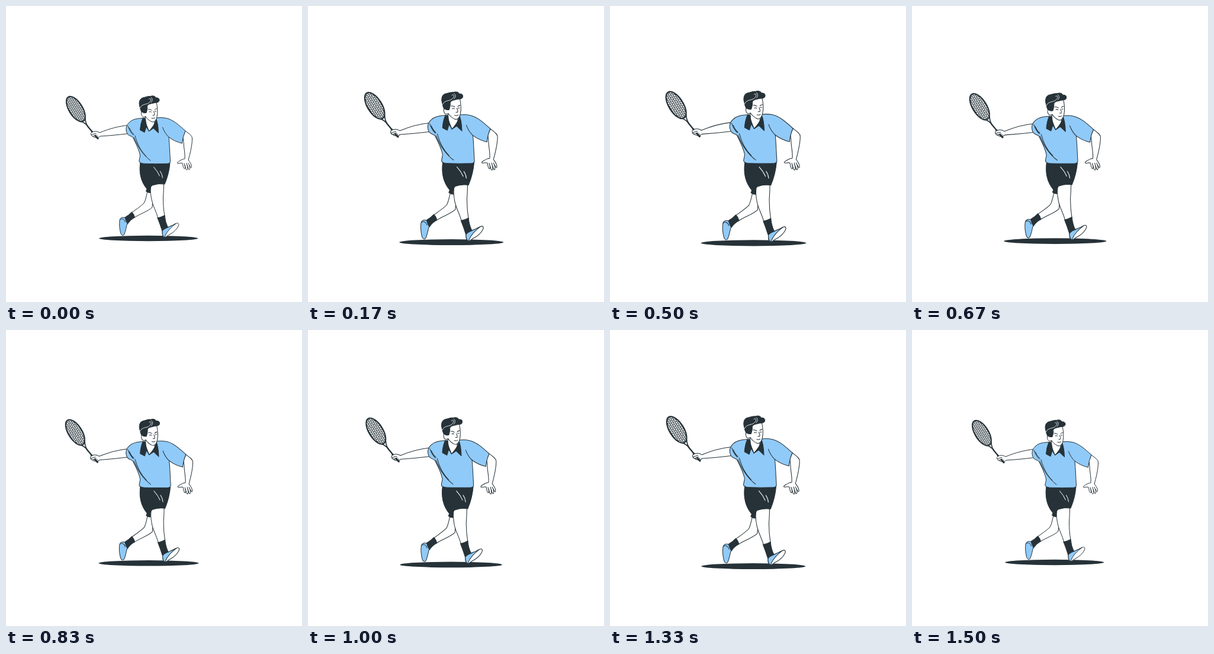
These frames come from a looping animation (500x500 px, 1540 ms). An HTML page:

```html
<!DOCTYPE html>
<html lang="en">
<head>
<meta charset="utf-8">
<title>Tennis player</title>
<style>
  html, body { margin: 0; height: 100%; overflow: hidden; background: #fff; }
  svg { display: block; width: 100%; height: 100%; }
  #player { fill: none; stroke: #263238; stroke-linecap: round; stroke-linejoin: round; }
  .skin { fill: #fff; }
  .blue { fill: #90caf9; }
  .dark { fill: #263238; }
  .light { stroke: #fff; }
</style>
</head>
<body>
<svg viewBox="0 0 500 500">
  <defs>
    <pattern id="strings" width="4" height="2.9" patternUnits="userSpaceOnUse" patternTransform="skewX(-45)">
      <path d="M0 1.45H4M2 0V2.9" stroke="#263238" stroke-width="1"/>
    </pattern>
  </defs>
  <g id="player">
    <ellipse class="dark" stroke="none" cx="240.7" cy="392.5" rx="83.5" ry="4.7"/>

    <g id="racket">
      <ellipse cx="117.9" cy="174.1" rx="24" ry="11.3" transform="rotate(58 117.9 174.1)" fill="url(#strings)" stroke-width="2.1"/>
      <path d="M127 195Q133 197 138 203M134 190Q134 197 138 203" stroke-width="1.6"/>
      <path d="M137 202L146 213" stroke-width="2.2"/>
      <path d="M145 212L155.200 223.700" stroke-width="3"/>
    </g>

    <g id="racket-arm">
      <path class="skin" d="M206 201.500C191 203 175 207 158 214C154 211.500 150 211 146 213C143.500 214 142.500 216 144 217.500C144 219.500 146 220 147 220C148 222 150 222 151.500 222C154 223.500 157 221.500 159 220C175 219 191 217.500 207 215.500Z"/>
      <path d="M144 217.500C147 217 149 215.500 152 215.500M147 220C149 219.500 151 218 153 218M151.500 222L155 219.500"/>
      <path d="M150.500 219L155 223.500" stroke-width="2.6"/>
    </g>

    <g id="back-leg">
      <path class="skin" d="M239 313C237 321 236 328 233 333C227 339 219 344 211 350L216 358C226 351 240 347 247 340L249 314Z"/>
      <path class="dark" d="M201 357Q208 353 212.500 348Q216 351 217.500 357Q210 361 205.500 368Z"/>
      <path class="blue" d="M201 357.500C196 356 192.500 358 192 362C191 369 192 377 193.500 383C194.500 387 197.500 389 199.500 386C202.500 380 203 373 205 367C203 365 202 361 201 357.500Z"/>
      <path d="M192.500 361C196 358 200 360 201.500 365"/>
    </g>
    <path class="dark" d="M227 264C224.500 280 227 296 238 309L236.500 313Q240 316 245 315.500L252 308L250 290Z"/>

    <g id="front-leg">
      <path class="skin" d="M246 301C243 309 244 317 246 327C248 338 254 347 257 359L268 355C266 343 265.500 334 265.500 324Q266.500 311 266.500 300Z"/>
      <path class="dark" d="M256 358Q262 357 268 353.500Q269 365 273.500 374L263.500 379Q260 368 256 358Z"/>
      <path class="skin" d="M264 379C270 374 280 372 287 367.500C291 365.500 293 368 291 372C288 378 282 383 276 386C272 388 270 391.500 267 390.500C263 388 264.500 383 264 379Z"/>
      <path class="blue" d="M264 379C270 374 280 372 287 367.500C279 374 272 380 268 390.500C263 388 264.500 383 264 379Z"/>
      <path d="M264 380Q269 374 274 374"/>
    </g>
    <path class="dark" d="M227 264L277 264C276 278 273 289 268 301Q258 299 247 303Q243 306 243 310C232 302 225 285 227 264Z"/>
    <path class="light" d="M249.500 272Q256 279 259.500 287M260.500 279Q264 284 264.500 290"/>

    <g id="free-arm">
      <path class="skin" d="M299 221L303 211C308 215 315 219 314.500 224C314.500 236 311 249 308 260C310 263 313.500 267 313.500 271.500C313.500 274 312 273.500 311.500 272L309.500 268.500C310.500 272 311 275.500 309.500 276.500C308 277 307.500 272 306 269C307 273 307 277 305.500 277C303.500 277 303.500 272 302 269C302.500 272 303 275 301.500 275C299 274 299 268 298 265.500C295 264.500 291 266.500 289.500 265.500C288 264 294 261 298 259C300 258 301 259 302 258C303 249 300 240 300 230Z"/>
      <path d="M302 269L301 266M306 269L305 265.500M309.500 268.500L308 265.500"/>
    </g>

    <g id="shirt">
      <path class="blue" d="M230 189.500C222 190 214 191 209 196C202 202 201.500 209 205 216C207 219 211 219.500 214 221.500C219 231 225 244 226.500 252C226.500 257 224.500 259 225 263Q227 266 233 266.300Q254 267 273 266.300Q278 266 277.500 261C276.500 248 276.500 236 275 221.500Q285 229 297.500 232Q298.500 221 303 211C292 201 282 192 271 189.500Q262 187.500 253 189Z"/>
      <path d="M206 203C208 209 211 214 215 218M208.500 206Q211 213 216 217M218 219C222 235 229 246 237 254M216 222C223 239 232 252 244 261M264.500 205C267 212 271 218 275.500 222"/>
    </g>

    <g id="head">
      <path class="skin" d="M236 181L235 195L241.500 211.500L250 204Q251 199 251 192Z"/>
      <path class="dark" d="M231 189.500Q227 199 226.500 209.500L234 213.500L237 204L241.500 211.500Q236 202 235.500 191Z"/>
      <path class="dark" d="M253 189Q257 197 257.500 214.500L249 206.500L241.500 211.500Q250 202 252.500 195Z"/>
      <path class="skin" d="M230 175C227.500 179 228 186 231.500 187.500C233.500 188 235 187 236 186.500C238 190.500 241 193 246 195.500C251 197.500 254 192 255 187C256.500 180 256 171 254 162L237 165Z"/>
      <path class="dark" d="M229.500 179C227 177 227 173 226 170C224 164 225 157 231 155C236 154 239 152 244 152.500C248 151 252 152 253 155C256 154.500 259.500 156 259 159.500C258.500 163 254 163.500 251 163.500C247 165 243 164.500 240 167C237.500 169 239.500 172 238.500 175L237 180.500Q233 181.500 229.500 179Z"/>
      <path class="light" stroke-width=".8" d="M226.500 172C230 164 239 167.500 243 162C246 159 245 155 241.500 157M245 163C248 160 248 156 245 154.500"/>
      <path d="M240.500 174.500Q243 173.800 246 176M250.800 175.500Q252 173.500 254.500 173.500M242 178.800Q244 177.800 245.500 179M251.500 178L253.500 177.700M249.500 178C250 181 252 182.500 250.500 184.500L248 184.500M246 189.500Q249 190.500 251.500 189"/>
    </g>
  </g>
</svg>
<script>
  const player = document.getElementById("player");
  const LOOP = 1540, FPS = 24;
  const CENTER = [212.5, 274.5];

  // Two beats: the first relaxes twice as slowly as the second.
  function beat(t) {
    if (t < 300) return t / 300;
    if (t < 900) return (900 - t) / 600;
    if (t < 1200) return (t - 900) / 300;
    return Math.max(0, (1500 - t) / 300);
  }

  function draw(now) {
    const tick = Math.floor(now % LOOP / 10) * 10;
    const step = Math.floor((tick + 4.9) * FPS / 1000 + 0.001);
    const scale = 1 + 0.1 * beat(step * 1000 / FPS);
    const [x, y] = CENTER;
    player.setAttribute("transform", `translate(${x} ${y}) scale(${scale}) translate(${-x} ${-y})`);
  }

  const start = performance.now();
  function loop() {
    draw(performance.now() - start);
    requestAnimationFrame(loop);
  }
  loop();
</script>
</body>
</html>
```
